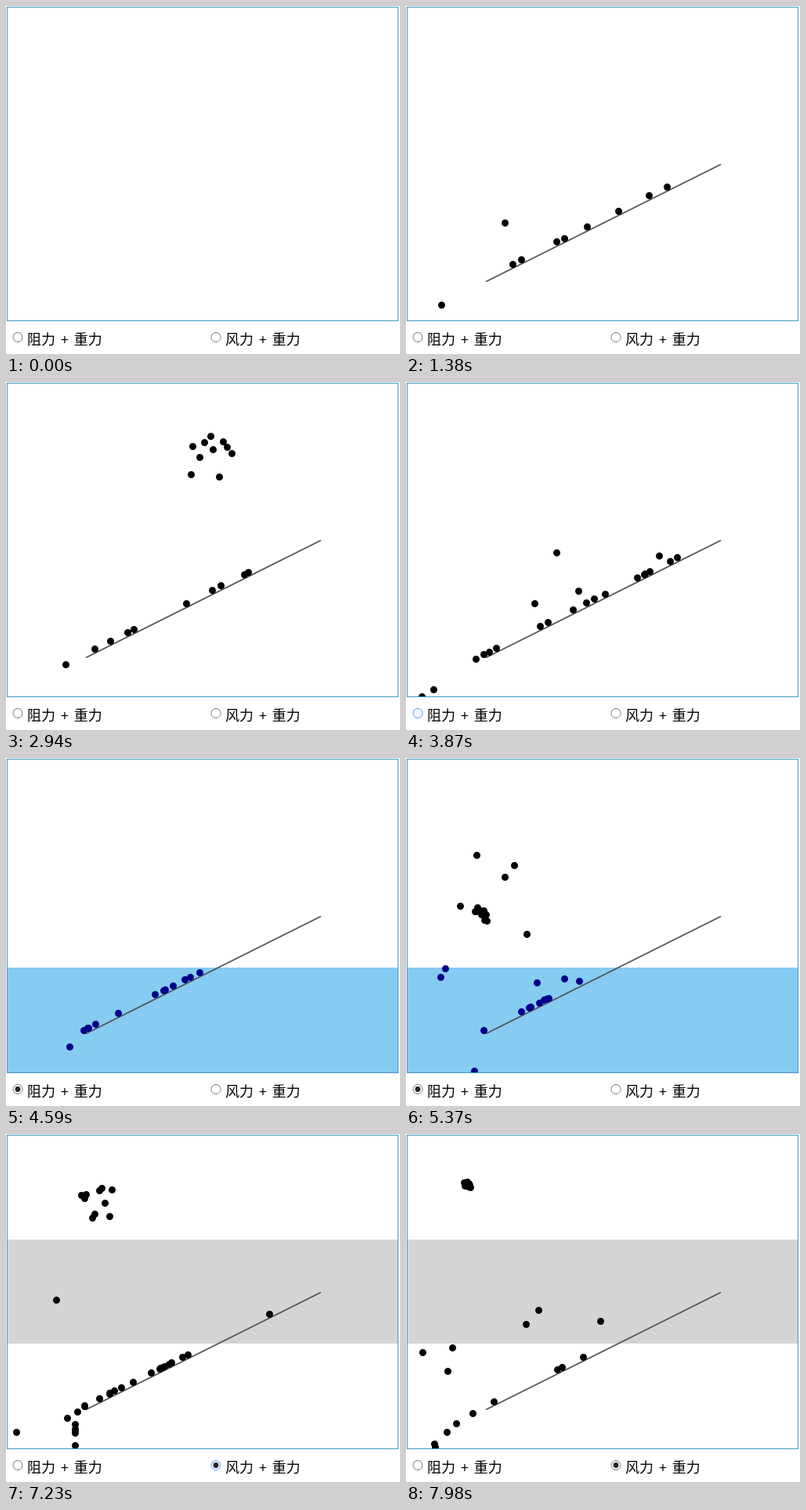
Recreate the animation shown at these times as an HTML page. Size 503x445 px, loop 8000 ms.

```html
<!DOCTYPE html>
<html lang="zh">
<head>
<meta charset="utf-8">
<style>
  html, body { margin: 0; width: 100%; height: 100%; overflow: hidden; background: #fff; }
  svg { display: block; }
  text { font: 18px "Noto Sans", "Noto Sans CJK SC", "Noto Sans CJK", sans-serif; word-spacing: 2px; }
  .ball { fill: none; stroke-width: 9; stroke-linecap: round; }
  .radio { fill: #fff; stroke: #767676; }
  .radio.hover { fill: #f4f9ff; stroke: #4a9bf5; }
</style>
</head>
<body>
<svg width="503" height="445" viewBox="0 0 503 445">
  <clipPath id="stage"><rect x="2" y="2" width="498" height="400"/></clipPath>
  <rect id="water" x="2" y="268" width="498" height="134" fill="#86cbf2"/>
  <rect id="wind" x="2" y="135" width="498" height="133" fill="#d4d4d4"/>
  <rect x="1.5" y="1.5" width="499" height="401" fill="none" stroke="#4394c0"/>
  <path id="slope" d="M102 352.5L402 202.5" stroke="#505050" stroke-width="1.7"/>
  <g clip-path="url(#stage)">
    <path id="dry" class="ball" stroke="#000"/>
    <path id="wet" class="ball" stroke="#00008b"/>
  </g>
  <circle id="radio1" class="radio" cx="15" cy="423.5" r="6"/>
  <circle id="dot1" cx="15" cy="423.5" r="3.4" fill="#222"/>
  <text x="27" y="433">阻力 + 重力</text>
  <circle id="radio2" class="radio" cx="268" cy="423.5" r="6"/>
  <circle id="dot2" cx="268" cy="423.5" r="3.4" fill="#222"/>
  <text x="280" y="433">风力 + 重力</text>
</svg>
<script>
const LOOP = 8000, STEP = 10, DT = STEP / 1000;
const GRAVITY = 600, DRAG = 4.5, GUST = 300, SPEED = 150, COUNT = 10;
const WATER = 4110, WIND = 7050;      // when each mode is switched on
const BAND = 135, SURFACE = 268;      // top of the windy band and of the water

// time and place of every click; each one throws out a burst of balls
const clicks = [
  [450, 230, 95], [1990, 235, 90], [2740, 262, 83], [3150, 265, 118],
  [4720, 126, 78], [5310, 96, 199], [5870, 297, 85], [6250, 150, 57],
  [7080, 115, 78], [7950, 78, 65]
];

const $ = id => document.getElementById(id);
const inWater = (y, t) => y > SURFACE && t >= WATER && t < WIND;
const inWind = (y, t) => y > BAND && y < SURFACE && t >= WIND;

let seed = 7;
function random() {
  seed = seed * 16807 % 2147483647;
  return seed / 2147483647;
}

function step(b, t) {
  const k = inWater(b.y, t) ? DRAG : 0;
  b.vx += ((inWind(b.y, t) ? GUST : 0) - k * b.vx) * DT;
  b.vy += (GRAVITY - k * b.vy) * DT;
  b.x += b.vx * DT;
  b.y += b.vy * DT;
  const top = 397.5 - b.x / 2;
  if (b.x > 98 && b.x < 404 && b.y > top && b.y < top + 15) {
    // keep only the speed along the slope
    const s = (2 * b.vx - b.vy) / 5;
    b.y = top;
    b.vx = 2 * s;
    b.vy = -s;
  }
}

function launch(start, x, y, i) {
  const b = {
    x, y,
    vx: SPEED * (2 * (i + random()) / COUNT - 1),
    vy: SPEED * (2 * random() - 1)
  };
  const path = [];
  for (let t = start; t < LOOP && b.y < 410; t += STEP) {
    path.push([b.x, b.y]);
    step(b, t);
  }
  return { start, path };
}

const balls = clicks.flatMap(([t, x, y]) =>
  Array.from({ length: COUNT }, (_, i) => launch(t, x, y, i)));

const show = (id, on) => $(id).style.display = on ? "" : "none";
const hover = (id, on) => $(id).classList.toggle("hover", on);

function draw(t) {
  const water = t >= WATER && t < WIND, wind = t >= WIND;
  show("water", water);
  show("dot1", water);
  show("wind", wind);
  show("dot2", wind);
  show("slope", t >= 420);
  hover("radio1", t >= 3540 && t < 4410);
  hover("radio2", t >= 6780 && t < 7500);
  let dry = "", wet = "";
  for (const { start, path } of balls) {
    const p = path[(t - start) / STEP];
    if (!p) continue;
    const mark = `M${Math.round(p[0]) + .5} ${Math.round(p[1]) + .5}h.01`;
    if (inWater(p[1], t)) wet += mark; else dry += mark;
  }
  $("dry").setAttribute("d", dry);
  $("wet").setAttribute("d", wet);
}

const begin = performance.now();
function tick() {
  const t = (performance.now() - begin) % LOOP;
  draw(Math.floor(t / 30) * 30);
  requestAnimationFrame(tick);
}
tick();
</script>
</body>
</html>
```
